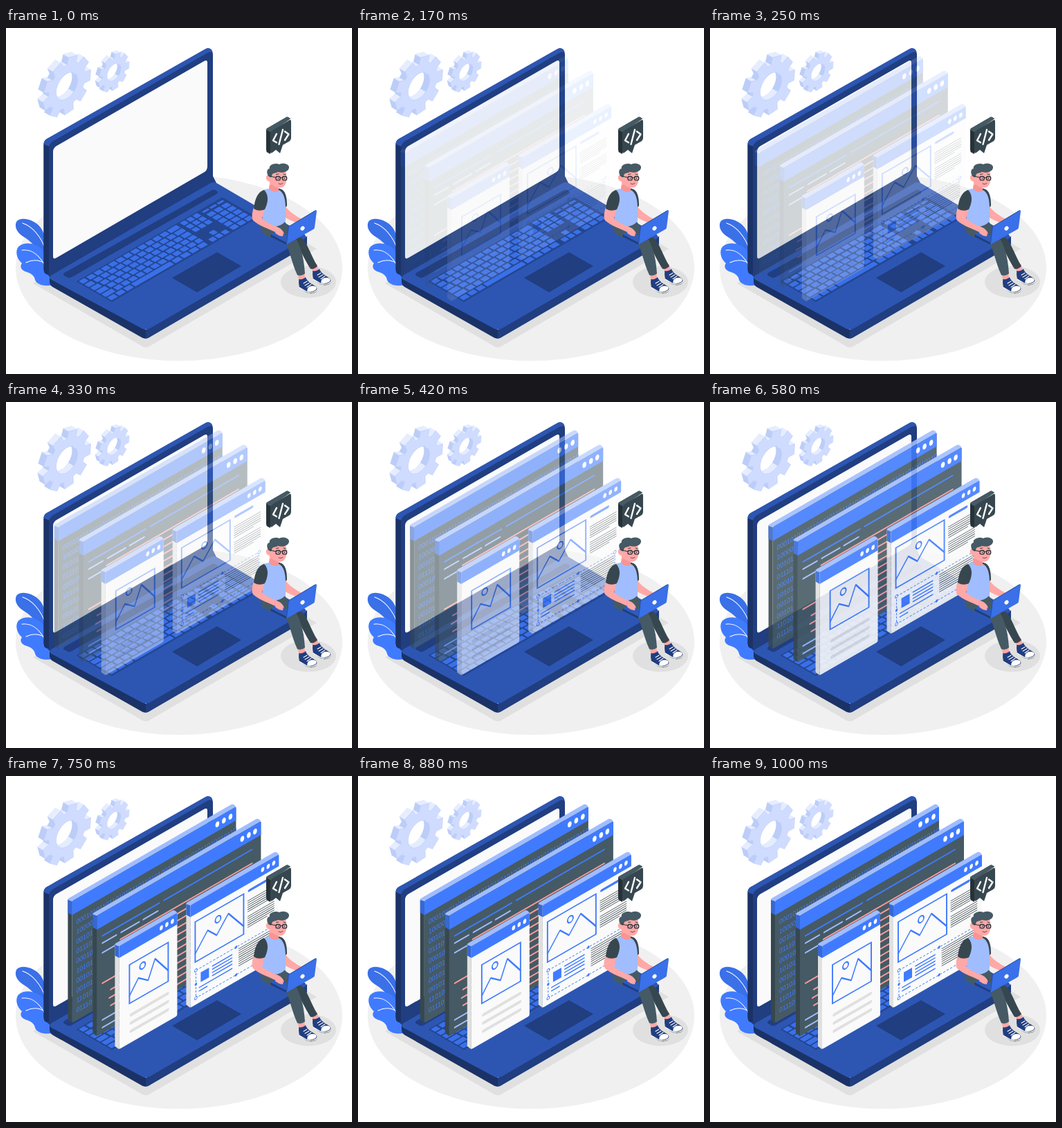
These frames come from a looping animation (500 by 500 pixels, 1040 ms). An HTML page:

```html
<!DOCTYPE html>
<html lang="en">
<head>
<meta charset="utf-8">
<title>Developer at a laptop</title>
<style>
html, body { margin: 0; width: 100%; height: 100%; overflow: hidden; background: #fff; }
svg { display: block; width: 100vw; height: 100vh; }
text { font: 10px "Liberation Sans", Arial, sans-serif; fill: #407bff; }
</style>
</head>
<body>
<svg id="stage" viewBox="0 0 500 500"></svg>
<script>
const SLOPE = 0.577;
const BLUE = '#407bff', MID = '#2d56b3', DEEP = '#203e80', NAVY = '#1a3266', PALE = '#a0bdff';
const KEY = '#3a70e8', SLATE = '#455a64', DARK = '#37474f', INK = '#263238', SKIN = '#ffa8a7', PINK = '#ff9c9c';

// Markup helpers
const path = (d, fill, extra = '') => `<path d="${d}" fill="${fill}" ${extra}/>`;
const line = (d, color, width, extra = '') =>
  path(d, 'none', `stroke="${color}" stroke-width="${width}" stroke-linecap="round" stroke-linejoin="round" ${extra}`);
const rect = (x, y, w, h, fill, extra = '') =>
  `<rect x="${x}" y="${y}" width="${w}" height="${h}" fill="${fill}" ${extra}/>`;
const oval = (cx, cy, rx, ry, fill, extra = '') =>
  `<ellipse cx="${cx}" cy="${cy}" rx="${rx}" ry="${ry}" fill="${fill}" ${extra}/>`;
const dash = (x1, x2, y, color, width) => line(`M${x1} ${y}H${x2}`, color, width);
const repeat = (n, draw) => [...Array(n).keys()].map(draw).join('');

// Upright plane: x climbs to the right, y is vertical
const upright = (x, y, body) => `<g transform="matrix(1,${-SLOPE},0,1,${x},${y})">${body}</g>`;

function gear(cx, cy, size) {
  const teeth = 9, depth = [-7.8, -4.5];
  const onFace = (degrees, r) => {
    const a = degrees * Math.PI / 180, x = 0.866 * r * Math.cos(a);
    return [x, r * Math.sin(a) - SLOPE * x];
  };
  const outline = points => 'M' + points.map(p => p.map(v => v.toFixed(1)).join(' ')).join('L') + 'Z';
  const moveBack = ([x, y]) => [x + depth[0], y + depth[1]];
  const rim = [], hole = [];
  for (let i = 0; i < teeth; i++) {
    for (const [turn, r] of [[-15, 30.5], [-10.5, 40], [10.5, 40], [15, 30.5]]) rim.push(onFace(-75 + turn + i * 360 / teeth, r));
  }
  for (let a = 0; a < 360; a += 10) hole.push(onFace(-a, 18));

  // Only the walls turned up or left can be seen
  const walls = points => points.map((p, i) => {
    const q = points[(i + 1) % points.length];
    const dx = q[0] - p[0], dy = q[1] - p[1];
    if (dx * depth[1] - dy * depth[0] > 0) return '';
    const fill = Math.abs(dx) > 0.6 * Math.abs(dy) ? '#e6edff' : '#bccdf8';
    return path(outline([p, q, moveBack(q), moveBack(p)]), fill, `stroke="${fill}" stroke-width=".4"`);
  }).join('');

  const ring = (a, b) => outline(a) + outline(b);
  return `<g transform="translate(${cx},${cy}) scale(${size})">` +
    path(ring(rim.map(moveBack), hole.map(moveBack)), '#bccdf8', 'fill-rule="evenodd"') +
    walls(rim) + walls(hole) +
    path(ring(rim, hole), '#cfdcff', 'fill-rule="evenodd" stroke="#bccdf8" stroke-width=".6"') + '</g>';
}

function plant() {
  return path('M57 352C54 328 42 313 29 304C18 298 11 289 15 280C21 272 38 276 47 285C56 294 59 308 60 330Z', KEY) +
    path('M70 371C58 374 45 372 42 364C41 357 35 354 28 352C21 349 20 344 23 340C15 333 13 322 18 316C28 308 43 311 52 320L68 350Z', BLUE) +
    line('M24 282C37 286 50 300 57 320M23 321C38 319 50 330 58 347M29 339C39 334 48 335 56 340', '#fff', 1.1);
}

function keyboard() {
  const key = (u, row, w = 8.6) => rect(u, row * 8.2, w, 6.5, KEY, 'rx=".8"');
  let keys = '';
  for (let row = 0; row < 6; row++) {
    if (row < 5) {
      const shift = row * 1.6;
      keys += key(0, row, 8 + shift) + repeat(11, i => key(10.6 + shift + i * 10.6, row)) +
        key(127.2 + shift, row, 13.8 - shift);
    } else {
      keys += repeat(3, i => key(i * 11.5, row, 9.4)) + key(34.5, row, 56) +
        repeat(4, i => key(92.8 + i * 12.2, row, 10.2));
    }
    if (row < 3 || row === 5) keys += repeat(3, i => key(146 + i * 9, row, 7));
    if (row === 4) keys += key(155, row, 7);
    keys += repeat(3, i => row ? key(176 + i * 10.6, row) : rect(176 + i * 10.6, 2, 8.6, 3, KEY));
  }
  return `<g transform="matrix(1,${-SLOPE},1,${SLOPE},105,366)">` +
    rect(-2, -1.5, 211, 51.5, '#24468f') + keys + '</g>';
}

const laptopShadow = () => path('M39 369L290 225L449 319L207 460Q202 463 197 460Z', '#e0e0e0');

function laptop() {
  // base
  return path('M56 353L299 214L305 226L68 364Z', DEEP) +
    path('M63 360L202 436V449Q198 449 194 446L67 374Q63 371 63 367Z', NAVY) +
    path('M202 436L435 301V311Q435 315 431 317L209 446Q205 449 202 449Z', DEEP) +
    path('M66 357L294 225Q300 221 306 225L431 298Q436 302 431 305L208 434Q202 437 196 434L66 364Q61 361 66 357Z', MID) +
    path('M84 354L298 234Q301 233 304 235Q308 238 304 240L95 360Q91 362 88 360L84 358Q82 356 84 354Z', DEEP) +
    keyboard() +
    path('M240 361L305 324L340 344L276 382Z', DEEP) +
    // lid
    path('M54.500 168Q54.500 163 58.500 160.500L288 30.500Q293 27.500 297 31.500Q299 34 299 38V216Q299 220 295 223L66 355Q61 357 57 355Q54.500 353 54.500 349Z', DEEP) +
    path('M54.500 168Q54.500 163 58.500 160.500L288 30.500Q293 27.500 297 31.500L298 35Q295 34 291 36L67 164Q63 167 62 171Z', MID) +
    path('M54.500 168L62 171V356Q59 356 57 355Q54.500 353 54.500 349Z', NAVY) +
    path('M68 179Q68 174 72 171L286 48Q291 45 291 50V200Q291 205 287 208L73 332Q68 335 68 330Z', '#fafafa');
}

function frame({ x, y, w, h, bar, body, side, dots, content }) {
  return upright(x, y,
    path(`M0 0L-6 -6V${h - 8}L0 ${h}Z`, side) +
    path(`M0 0L-6 -6V${bar - 7}L0 ${bar}Z`, '#3568d4') +
    path(`M0 0L-6 -5.5Q-6 -7 -4.5 -7H${w - 7}Q${w - 4} -7 ${w} 0Z`, PALE) +
    rect(0, 0, w, h, body, 'rx="2"') +
    path(`M0 ${bar}V2Q0 0 2 0H${w - 2}Q${w} 0 ${w} 2V${bar}Z`, BLUE) +
    dots.map(dx => oval(dx, bar * 0.5, bar * 0.14, bar * 0.2, '#fff')).join('') + content);
}

function binaryWindow() {
  const rows = ['0001010110110101011011010100101010101011010010110',
    '10000', '00101', '01110', '00010', '10101', '00101', '00101', '11010', '01110'];
  const content = rows.map((digits, i) =>
    `<text transform="scale(.866,1)" x="7" y="${37 + i * 14.2}">${digits}</text>`).join('');
  return frame({ x: 94, y: 181, w: 237, h: 176, bar: 20, body: SLATE, side: DARK, dots: [210, 219.5, 229], content });
}

function codeWindow() {
  const row = (y, color, ...spans) => spans.map(([a, b]) => dash(a, b, y, color, 2.2)).join('');
  const content =
    row(33.5, BLUE, [8, 90], [97, 224]) +
    row(44, PALE, [8, 28], [35, 61], [67, 88]) +
    row(53.5, PINK, [34, 224]) +
    row(58, PALE, [8, 50]) +
    repeat(11, i => row(64 + i * 10.2, PINK, [100, 150])) +
    row(102, PINK, [8, 50]) + row(118, PINK, [20, 50]) +
    row(129, PINK, [18, 50]) + row(141, PINK, [20, 50]) +
    row(155, PALE, [8, 50]) + row(166, PALE, [8, 50]);
  return frame({ x: 130, y: 202, w: 237, h: 174, bar: 20, body: SLATE, side: DARK, dots: [210, 219.5, 228.5], content });
}

function picture(x, y, w, h, peaks, sunX, sunY) {
  return rect(x, y, w, h, 'none', `stroke="${BLUE}" stroke-width="1.9"`) +
    line(peaks, BLUE, 1.9) + oval(sunX, sunY, 4, 4.6, 'none', `stroke="${BLUE}" stroke-width="1.9"`);
}

function phoneWindow() {
  const content = picture(15, 35.5, 56, 56, 'M15 80.5L28 62L42 73.5L52 48L71 76', 34, 47.5) +
    repeat(3, i => dash(17.5, 70, 109 + i * 11.8, '#e0e0e0', 4.5));
  return frame({ x: 162, y: 246, w: 84, h: 149, bar: 17, body: '#fafafa', side: '#e0e0e0', dots: [61, 69, 77], content });
}

function pageWindow() {
  const text = (x1, x2, y, n) => repeat(n, i => dash(x1, i === n - 1 ? x2 - 10 : x2, y + i * 3.1, INK, 0.8));
  const content =
    picture(7, 28, 70, 58, 'M7 74L25 50.5L38 65L55 43.5L77 74.5', 40, 43) +
    dash(85, 109, 27.5, BLUE, 3.6) +
    text(83, 121, 41.5, 6) + text(83, 121, 64, 6) + text(70, 118, 103, 9) +
    rect(8, 98.5, 111, 40, 'none', `stroke="${BLUE}" stroke-width="1" stroke-dasharray="3 2"`) +
    rect(15, 105.5, 12, 14, BLUE) +
    repeat(4, i => dash(32, 60, 106 + i * 4.6, BLUE, 1.7)) +
    dash(13, 60, 126, BLUE, 1.7) + dash(13, 24, 131, BLUE, 1.7) +
    [[8, 98.5], [8, 138.5], [119, 98.5]].map(([x, y]) =>
      oval(x, y, 1.8, 2.1, '#fff', `stroke="${BLUE}" stroke-width="1"`)).join('') +
    [[66, 98.5], [66, 138.5], [8, 118.5]].map(([x, y]) => oval(x, y, 1.7, 2, BLUE)).join('');
  return frame({ x: 265, y: 187, w: 128, h: 148, bar: 17, body: '#fafafa', side: '#e0e0e0', dots: [104.5, 112.5, 120.5], content });
}

function bubble() {
  return path('M376 148Q376 145 379 144L404 129.500Q406 128 408 129L411 131L383 150L382 182L378 180Q376 179 376 176Z', INK) +
    path('M376 147Q376 145 379 144L404 129.500Q406 128 408 129L411 131L383 151Z', SLATE) +
    path('M382 153Q382 150 385 148L408 134Q412 131 412 135V159Q412 162 409 164L400 169L396 181L390 176L385 180Q382 182 382 179Z', DARK) +
    line('M391 153L386 162.500L391 165.500M400 147L394.500 168M403 149.500L408.500 153.500L403 162', '#fff', 2.4);
}

function shoe(x, y) {
  return `<g transform="translate(${x},${y})">` +
    path('M0 5L1 14L11 21C18 24 26 22 27 17L25 13Z', INK) +
    path('M0 2C4 3 8 1 10 -1C12 6 20 9 25 13C28 18 20 22 12 20L1 13Z', DEEP) +
    path('M13 15C16 11 21 11 25 13C28 18 20 21 12 19.500Z', '#fff') +
    line('M1 14L12 20.500C18 22 25 21 26.500 17', '#fff', 1.3) +
    line('M7 8L12 5M9 11L15 7.500M12 13.500L18 9.500', '#fff', 1.1) + '</g>';
}

function man() {
  const lens = x => rect(x, 214.5, 6.2, 5.4, 'none', `rx="2.2" stroke="${INK}" stroke-width="1.3"`);
  return path('M440 344L449 341L453 352L444 354ZM421 355L431 353L433 365L424 366Z', SKIN) +
    shoe(443, 349) + shoe(423, 361) +
    // legs
    path('M400 300L427 303C436 311 441 330 450 344Q446 349 440 348C432 336 428 324 419 313Z', DARK) +
    path('M368 284C366 295 374 301 389 304L404 311C410 320 412 337 421 357Q427 359 432 355C431 338 428 322 421 308L403 280Z', SLATE) +
    // far arm
    path('M402 256C410 266 418 271 427 276L421 282C412 278 405 276 402 272Z', SKIN) +
    path('M393 232C403 232 406 242 406 257L403 260L398 250Z', DARK) +
    // torso and head
    path('M371 235C377 231 390 231 396 235C403 240 404 252 404 262L404 279C397 288 382 290 371 282L370 262Z', PALE) +
    path('M381 224L394 226V235C391 238 383 237 380 232Z', '#f79594') +
    path('M384 206L404 207C407 216 406 226 400 230C395 232 388 230 384 226L381 228V222C375 221 374 213 379 212Z', SKIN) +
    path('M379 214C376 208 377 204 381 203C379 198 389 194 395 197C401 194 410 197 409 202C408 208 400 210 393 208C390 210 387 209 385 211L383 216Z', SLATE) +
    lens(390) + lens(399.5) +
    line('M381 214L390 216M396.500 216.500H399.500', INK, 1.2) + oval(393.5, 217.2, 0.7, 0.9, INK) + oval(402.3, 217.2, 0.7, 0.9, INK) +
    line('M390.500 211.500L394 211M401 211L404 212', INK, 0.9) + line('M394 225Q397 227 400 224.500', INK, 0.7) +
    // near arm
    path('M358 259C355 269 355 275 357 278C367 287 380 290 389 295C393 300 400 303 402 299C402 294 397 289 391 287C382 284 375 280 370 275L374 261Z', SKIN) +
    path('M373 234C362 237 359 252 358 261C364 265 370 264 374 262C378 254 381 242 373 234Z', DARK) +
    // small laptop
    path('M382 299L391 294L408 302L405 313L383 302Z', DEEP) +
    path('M382 298L391 293L410 301L405 310Z', '#2f5bbd') +
    path('M388 291C393 290 399 292 401 296L400 301C395 301 391 298 389 296Z', SKIN) +
    path('M405 311L408 289Q408 287 410 286L446 264Q449 262 449 265L446 288Q446 290 444 291L407 312Q405 313 405 311Z', KEY) +
    line('M405.500 311L408.300 288Q408.500 287 410 286L447 264', '#264a99', 0.9) +
    oval(428.5, 289.5, 3.4, 2.7, '#fff', 'transform="rotate(-50 428.5 289.5)"');
}

document.getElementById('stage').innerHTML =
  oval(250, 346.5, 236, 134.5, '#f0f0f0') + laptopShadow() + gear(88, 84, 1) + gear(156, 64, 0.64) + plant() + laptop() +
  oval(437, 367, 40, 23, '#e0e0e0') +
  `<g id="windows">${binaryWindow()}${codeWindow()}${pageWindow()}${phoneWindow()}</g>` + bubble() + man();

// Slide-in with a slight overshoot: cubic-bezier(.36, -.01, .5, 1.38)
const cubic = (a, b, s) => 3 * (1 - s) ** 2 * s * a + 3 * (1 - s) * s * s * b + s ** 3;
function ease(t) {
  if (t >= 1) return 1;
  let low = 0, high = 1;
  for (let i = 0; i < 30; i++) {
    const s = (low + high) / 2;
    if (cubic(0.36, 0.5, s) < t) low = s; else high = s;
  }
  return cubic(-0.01, 1.38, low);
}

const LOOP = 1040, FPS = 24;
const windows = document.getElementById('windows');
const start = performance.now();

function draw(ms) {
  // The motion is stepped at 24 pictures a second
  const step = Math.min(FPS, Math.floor((ms % LOOP + 6) * FPS / 1000));
  const progress = ease(step / FPS);
  windows.setAttribute('transform', `translate(${(30 * (progress - 1)).toFixed(2)},0)`);
  windows.setAttribute('opacity', Math.max(0, Math.min(1, progress)).toFixed(3));
}

function tick() {
  draw(performance.now() - start);
  requestAnimationFrame(tick);
}
tick();
</script>
</body>
</html>
```
